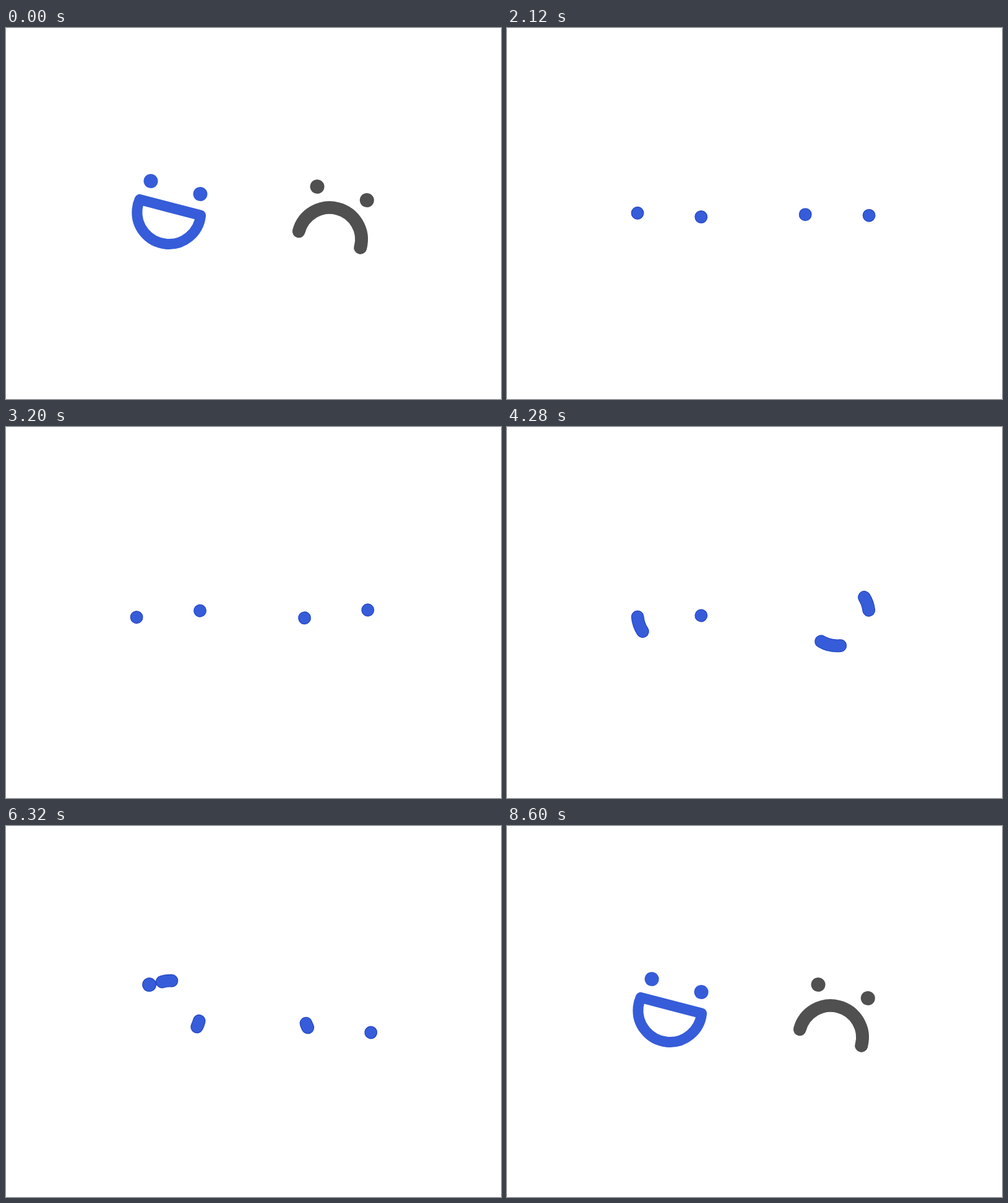
Animation of 800 by 600 pixels, one loop 10 s. Source, as an HTML page with a canvas:

```html
<!DOCTYPE html>
<html>
<head>
<meta charset="utf-8">
<style>
html, body { margin: 0; width: 100%; height: 100%; overflow: hidden; background: #fff; }
canvas { display: block; }
</style>
</head>
<body>
<canvas id="stage" width="800" height="600"></canvas>
<script>
const ctx = document.getElementById('stage').getContext('2d');
const LOOP = 10000, STEP = 40, START = 400, CYCLE = 1800, LAST = 5800, LEAD_IN = 68;
const R = 51.5, WIDTH = 20.8, EYE = 11.5, RIM_WIDTH = 1.2, TILT = 14.7;
const BLUE = [54, 92, 217], GRAY = [80, 80, 80], RIM = [35, 70, 195];
const rad = d => d * Math.PI / 180;
const clamp = v => Math.max(0, Math.min(1, v));
const ramp = (t, a, b) => clamp((t - a) / (b - a));
const ease = (t, a, b) => { const u = ramp(t, a, b); return u * u * (3 - 2 * u); };
const mix = (a, b, u) => a + (b - a) * u;
const rgb = (a, b, u) => `rgb(${a.map((v, i) => Math.round(mix(v, b[i], u)))})`;

// Eased keyframes: [time, value] pairs.
function keys(t, list) {
  let v = list[0][1];
  for (let i = 1; i < list.length; i++) {
    v = mix(v, list[i][1], ease(t, list[i - 1][0], list[i][0]));
  }
  return v;
}

// Each stroke: base angle, start delays of its two ends while spinning,
// then keyframes of its centre and of both ends for the settling turn.
const spinners = [
  {
    sway: 5, bias: -1,
    strokes: [
      { base: 180, delay: [115, 214],
        x: [[520, 262.3], [900, 264]], y: [[520, 302.4], [900, 303]],
        end: [[[115, 0], [520, 165.5]], [[115, 0], [597, 165.5]]] },
      { base: 0, delay: [286, 330],
        x: [[200, 262.3], [520, 265.5], [900, 264]], y: [[200, 302.4], [520, 301.7], [900, 303]],
        end: [[[286, 0], [925, 345.4]], [[286, 0], [737, 165.4]]] }
    ]
  },
  {
    sway: 4.3, bias: -3,
    strokes: [
      { base: 180, delay: [-68, 43],
        x: [[50, 533.6], [540, 538.5], [960, 523]], y: [[360, 302.4], [720, 365], [960, 342]],
        end: [[[-68, 0], [520, 174], [560, 174], [1000, 345.3]], [[43, 0], [520, 174], [560, 174], [800, 165.3]]] },
      { base: 0, delay: [127, 219],
        x: [[520, 533.6], [900, 523]], y: [[520, 302.4], [900, 342]],
        end: [[[127, 0], [820, 345.3]], [[152, 0], [820, 345.3]]] }
    ]
  }
];

function drawSpinner(s, t, color, rim) {
  const settle = t - LAST;
  const ending = settle >= -LEAD_IN;
  const phase = (t - START + LEAD_IN) % CYCLE - LEAD_IN;
  let off = s.bias - s.sway * Math.sin(2 * Math.PI * (phase - 520) / CYCLE);
  if (ending) off *= 1 - ease(settle, -LEAD_IN, 250);
  const size = ramp(t, 360, 480);
  for (const [style, width] of [[rim, WIDTH], [color, WIDTH - 2 * RIM_WIDTH]]) {
    ctx.strokeStyle = style;
    ctx.lineWidth = width * size;
    for (const k of s.strokes) {
      const [lead, trail] = [0, 1].map(i => ending
        ? keys(settle, k.end[i])
        : 360 * ease(phase, k.delay[i], 960));
      const from = rad(k.base + off - lead);
      const to = rad(k.base + off - Math.min(lead, trail));
      ctx.beginPath();
      ctx.arc(keys(settle, k.x), keys(settle, k.y), R, from, Math.max(to, from + 0.004));
      ctx.stroke();
    }
  }
}

function eye(x, y, size, color, rim, open = 1) {
  if (size <= 0) return;
  for (const [style, r] of [[rim, EYE], [color, EYE - RIM_WIDTH]]) {
    ctx.fillStyle = style;
    ctx.beginPath();
    ctx.ellipse(x, y, r * size, r * size * open, rad(TILT), 0, 2 * Math.PI);
    ctx.fill();
  }
}

// The smile opens: its upper lip rises from the lower one to a straight line.
function drawLaugh(u, color) {
  const lift = rad(9 * u), top = -51.5 * Math.sin(lift);
  ctx.save();
  ctx.translate(mix(264, 263.3, u), mix(303, 298, u));
  ctx.rotate(rad(14.6));
  ctx.strokeStyle = color;
  ctx.lineWidth = mix(WIDTH, 17, u);
  ctx.beginPath();
  ctx.arc(0, 0, 51.5, -lift, Math.PI + lift);
  ctx.ellipse(0, top, 51.5 * Math.cos(lift), 51.5 * (1 - u), 0, Math.PI, 0, true);
  ctx.closePath();
  ctx.stroke();
  ctx.restore();
}

function draw(t) {
  ctx.clearRect(0, 0, 800, 600);
  if (t < STEP) t = LOOP - STEP;
  if (t < START) return;
  const calm = ramp(t, 6640, 7040);
  const blue = rgb(BLUE, BLUE, 0), blueRim = rgb(RIM, BLUE, calm);
  const mood = rgb(BLUE, GRAY, calm), moodRim = rgb(RIM, GRAY, calm);
  const laugh = ease(t, 8200, 8600);

  if (laugh > 0) drawLaugh(laugh, blue);
  else drawSpinner(spinners[0], t, blue, blueRim);
  drawSpinner(spinners[1], t, mood, moodRim);

  const rise = ease(t, 6280, 6520);
  const rise2 = ease(t, 6480, 6720);
  eye(mix(mix(231.5, 233, rise), 234, laugh), mix(mix(257, 251.5, rise), 247.5, laugh),
    ease(t, 6160, 6310), blue, blueRim);
  eye(mix(313, 314, laugh), mix(mix(278, 272.5, rise2), 268.5, laugh),
    ease(t, 6360, 6520), blue, blueRim);

  const open = 1 - 0.9 * Math.sin(Math.PI * ramp(t, 7600, 7800));
  eye(503, 256.5, ease(t, 6600, 6800), mood, moodRim, open);
  eye(583.3, 278.5, ease(t, 6720, 6920), mood, moodRim, open);
}

ctx.lineCap = ctx.lineJoin = 'round';
const begin = performance.now();
function frame() {
  const t = (performance.now() - begin) % LOOP;
  draw(Math.floor(t / STEP) * STEP);
  requestAnimationFrame(frame);
}
frame();
</script>
</body>
</html>
```
